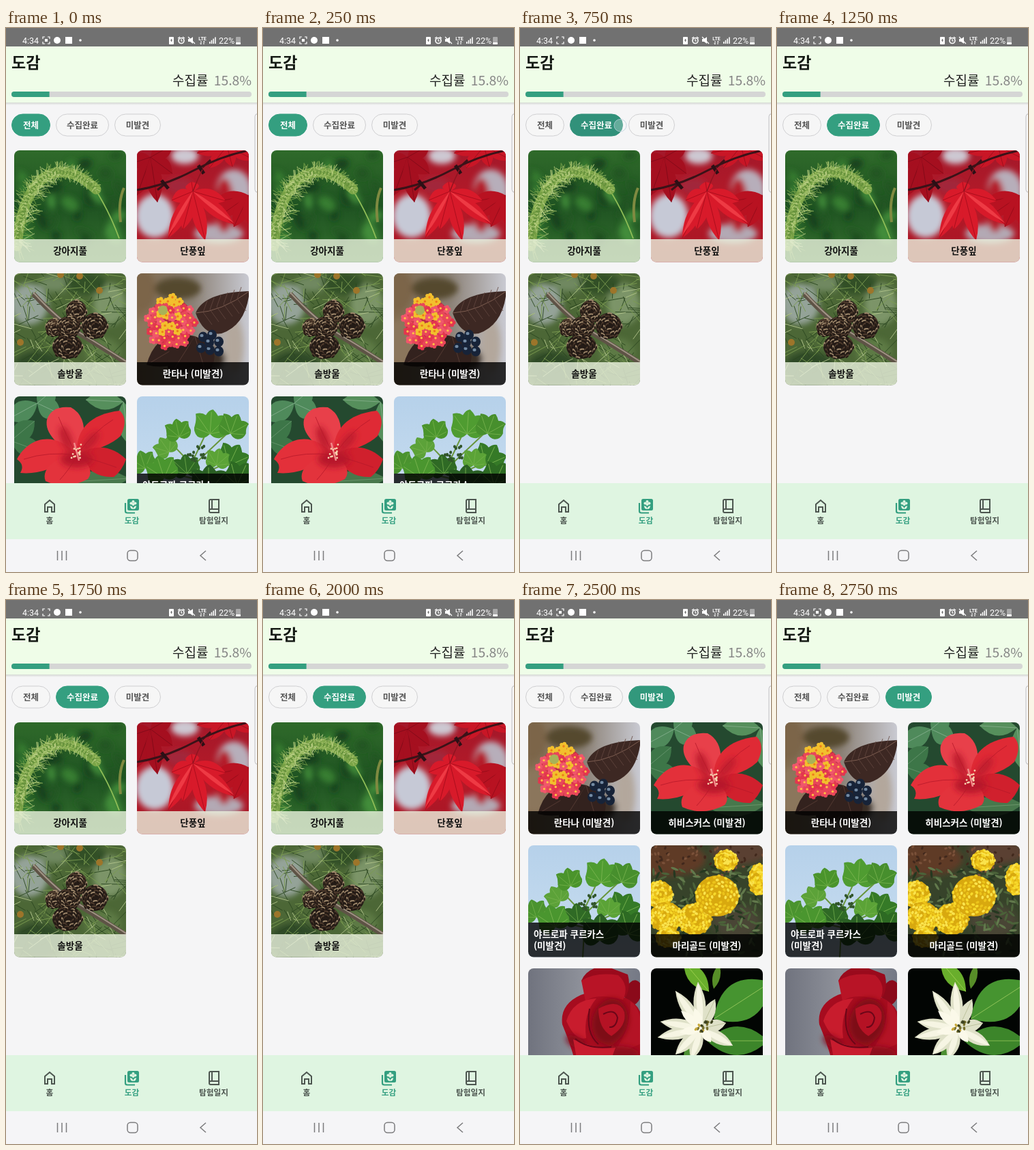
Write an HTML page that moves like this. It is 368x796 px and loops after 3 s.

```html
<!DOCTYPE html>
<html lang="ko">
<head>
<meta charset="utf-8">
<style>
html, body { margin: 0; width: 100%; height: 100%; overflow: hidden; background: #f5f5f6; }
svg { display: block; width: 100%; height: 100%; }
text { font-family: "Noto Sans CJK KR", "Noto Sans CJK", "Noto Sans", sans-serif; }
.status text { font-family: Roboto, sans-serif; fill: #fff; }
</style>
</head>
<body>
<svg id="stage" viewBox="0 0 368 796"></svg>
<script>
const GREEN = '#349f80';

// Shape helpers
let seed = 7;
const rnd = (a, b) => {
  seed = (seed * 16807) % 2147483647;
  return a + (b - a) * seed / 2147483647;
};
const pick = list => list[rnd(0, list.length) | 0];
const repeat = (n, fn) => Array.from({ length: n }, (_, i) => fn(i)).join('');
const rect = (x, y, w, h, fill, r = 0, extra = '') =>
  `<rect x="${x}" y="${y}" width="${w}" height="${h}" rx="${r}" fill="${fill}" ${extra}/>`;
const oval = (x, y, rx, ry, fill, turn = 0) =>
  `<ellipse cx="${x}" cy="${y}" rx="${rx}" ry="${ry}" fill="${fill}" transform="rotate(${turn} ${x} ${y})"/>`;
const shape = (d, fill) => `<path d="${d}" fill="${fill}"/>`;
const line = (d, color, width = 1, extra = '') =>
  `<path d="${d}" fill="none" stroke="${color}" stroke-width="${width}" ${extra}/>`;
const soft = body => `<g filter="url(#soft)">${body}</g>`;
const label = (x, y, size, fill, str, weight = 700, anchor = 'middle') =>
  `<text x="${x}" y="${y}" font-size="${size}" fill="${fill}" font-weight="${weight}" text-anchor="${anchor}">${str}</text>`;
const gradient = (id, stops, x2 = 0, y2 = 1) =>
  `<linearGradient id="${id}" x2="${x2}" y2="${y2}">${stops.map((c, i) =>
    `<stop offset="${i / (stops.length - 1)}" stop-color="${c}"/>`).join('')}</linearGradient>`;

// Fills an ellipse from its rim to its centre with evenly spread parts
const spiral = (n, x, y, rx, ry, part) => repeat(n, i => {
  const angle = i * 2.4, r = Math.sqrt(1 - i / n);
  return part(x + rx * r * Math.cos(angle), y + ry * r * Math.sin(angle), r, angle * 57.3, i);
});

// A pointed leaf or petal from one point to another, with a midrib
function leaf(x1, y1, x2, y2, width, fill, rib) {
  const len = Math.hypot(x2 - x1, y2 - y1);
  const nx = (y1 - y2) / len * width, ny = (x2 - x1) / len * width;
  const mx = (x1 + x2) / 2, my = (y1 + y2) / 2;
  return shape(`M${x1} ${y1}Q${mx + nx} ${my + ny} ${x2} ${y2}Q${mx - nx} ${my - ny} ${x1} ${y1}`, fill) +
    (rib ? line(`M${x1} ${y1}L${x2} ${y2}`, rib, .8) : '');
}
const fan = (x, y, tips, width, fill, rib) =>
  tips.map(([a, b]) => leaf(x, y, a, b, width, fill, rib)).join('');

// Pictures, each on a 164 x 164 square
function foxtail() {
  const bristle = i => {
    const t = i / 420, u = 1 - t;
    const at = (a, b, c, d) => u * u * u * a + 3 * u * u * t * b + 3 * u * t * t * c + t * t * t * d;
    const x = at(4, 12, 62, 120), y = at(140, 40, 2, 57);
    const angle = rnd(0, 6.28), reach = (6 + 16 * Math.sqrt(u)) * rnd(.7, 1.25);
    return line(`M${x} ${y}l${Math.cos(angle) * reach + 3} ${Math.sin(angle) * reach}`,
      pick(['#a9c66d', '#86ad50', '#c3d590', '#6b9440']), .8);
  };
  const ear = 'M4 140C12 40 62 2 120 57';
  return rect(0, 0, 164, 164, 'url(#meadow)') +
    soft(repeat(30, () => oval(rnd(0, 164), rnd(0, 140), rnd(6, 16), rnd(4, 10),
      pick(['#15401b', '#387e31', '#205524', '#438d3a']), rnd(0, 180)))) +
    line('M117 54Q140 90 154 129', '#8fbd57', 1.8) +
    line('M156 105Q152 75 161 55', '#7f8a41', 4) +
    line(ear, '#7ba548', 15, 'stroke-linecap="round"') + repeat(420, bristle) +
    line(ear, '#63903a', 5, 'stroke-dasharray="2 3"');
}

function maple() {
  return rect(0, 0, 164, 164, 'url(#crimson)') +
    soft(oval(26, 96, 28, 32, '#c6c9d6') + oval(142, 58, 26, 30, '#b7aeba') +
      oval(70, 8, 20, 12, '#cdc8d2') + oval(120, 122, 36, 14, '#b3a9b4') +
      oval(62, 52, 20, 12, '#a2283a') + oval(128, 80, 14, 40, '#b41c2b')) +
    fan(20, 10, [[-10, 20], [0, 66], [30, 76], [52, 34], [52, -8]], 24, '#a50f1f', '#7c0a17') +
    fan(132, -6, [[88, 4], [106, 26], [140, 24], [172, 14]], 18, '#c91626', '#930d1a') +
    fan(164, 66, [[112, 76], [118, 98], [142, 112], [168, 112]], 22, '#b81221', '#8e0b19') +
    line('M0 58Q40 52 82 30T164 0M40 50L30 58M96 25L108 14', '#3b1218', 3) +
    line('M36 44L46 56M90 22L98 34', '#2c1016', 5) +
    fan(82, 60, [[51, 73], [46, 128], [67, 116], [100, 132], [142, 108], [130, 74], [80, 46]], 20, '#d81a2a', '#a00b1a') +
    fan(82, 60, [[46, 124], [142, 106]], 6, '#ee3a44') +
    line('M82 60Q88 44 96 28', '#8e1420', 1.5);
}

function pinecones() {
  const cone = (x, y, rx, ry) => oval(x, y, rx, ry, '#241b16') +
    spiral(34, x, y, rx, ry, (px, py, r, turn, i) =>
      oval(px, py, 3.6, 1.5, i % 2 ? '#4d3a2c' : '#9a8468', turn + 90) + oval(px, py + 1.6, 2.6, 1, '#211813', turn + 90));
  const needles = (n, color) => repeat(n, () => {
    const x = rnd(-10, 174), y = rnd(-10, 174);
    return line(`M${x} ${y}l${rnd(-36, 36)} ${rnd(-30, 30)}`, color, .9);
  });
  return rect(0, 0, 164, 164, '#4c6736') +
    soft(oval(22, 45, 28, 30, '#94a398') + oval(140, 45, 24, 30, '#7b9468') + oval(60, 15, 24, 12, '#6f8860') +
      oval(35, 140, 38, 26, '#2f4a28') + oval(105, 15, 30, 16, '#334f28') + oval(130, 115, 26, 20, '#5d7a45')) +
    needles(90, '#2b4720') + needles(100, '#7c9c51') + needles(35, '#b3c48c') +
    line('M28 30Q65 70 95 88T166 132', '#5e5346', 7) +
    line('M28 28Q65 68 95 86T166 130', '#a09485', 2) +
    [[96, 4], [125, 25], [9, 101], [68, 2]].map(([x, y]) => oval(x, y, 5, 5, '#9d752a')).join('') +
    cone(91, 56, 15, 17) + cone(118, 77, 19, 19) + cone(59, 79, 13, 13) +
    cone(78, 107, 22, 18) + cone(80, 78, 18, 15);
}

function lantana() {
  const blossom = (x, y, fill, eye) => repeat(5, i =>
    oval(x + 3.6 * Math.cos(i * 1.257), y + 3.6 * Math.sin(i * 1.257), 2.9, 2.9, fill)) +
    oval(x, y, 1.7, 1.7, eye);
  const berries = [[97, 93], [110, 90], [120, 100], [94, 109], [107, 112], [120, 114], [106, 101]];
  return rect(0, 0, 164, 164, 'url(#dusk)') +
    soft(oval(5, 25, 22, 30, '#7c6548') + oval(60, 22, 34, 16, '#55492f') + oval(10, 100, 26, 34, '#8b765b') +
      oval(142, 105, 14, 40, '#b3a79c') + oval(90, 125, 40, 20, '#3b2d25')) +
    fan(85, 92, [[14, 134], [48, 150], [102, 150]], 40, '#33221e', '#5c4038') +
    shape('M86 58Q98 28 165 26Q160 76 124 88Q98 92 86 58Z', '#3d2823') +
    line('M86 58Q124 56 165 26', '#7d5d50', 1) +
    repeat(6, i => line(`M${97 + i * 10} ${57 - i * 4}l6 -17M${97 + i * 10} ${57 - i * 4}l13 18`, '#644840', .8)) +
    oval(50, 72, 33, 36, '#b92f43') +
    spiral(46, 49, 72, 35, 38, (x, y, r, turn, i) => {
      const warm = y < 48 || r < .55 && i % 2;
      return blossom(x, y, warm ? '#f2c02d' : pick(['#e3364e', '#f0566b', '#e8475a']), warm ? '#ee7d1b' : '#ffc045');
    }) +
    oval(38, 54, 7, 7, '#a8b258') +
    berries.map(([x, y]) => oval(x, y, 7, 7.5, '#172338') + oval(x - 2, y - 2, 2.6, 2.2, '#7289a2')).join('');
}

function hibiscus() {
  const red = '#df2a35', dark = '#b5182a';
  return rect(0, 0, 164, 164, '#24492f') +
    fan(34, 10, [[-10, 34], [68, 26], [60, -12]], 30, '#4f8a5b', '#8bb394') +
    fan(-5, 65, [[30, 36], [42, 82]], 28, '#3d7648', '#6b9972') +
    fan(160, 8, [[105, 5], [168, 70]], 26, '#568f5c', '#8ab18e') +
    leaf(85, 125, 168, 120, 30, '#48784c', '#739b72') +
    shape('M92 86C65 74 44 54 48 34Q55 13 83 16Q106 28 102 64Z', '#e8404a') +
    shape('M92 84C90 52 108 26 155 21Q168 34 156 58Q137 76 92 84Z', red) +
    shape('M92 86C62 50 22 58 4 92Q16 100 9 112Q44 116 92 86Z', '#e3303a') +
    shape('M93 86C122 66 148 76 164 92Q158 109 146 118Q113 120 93 86Z', '#d0202d') +
    shape('M93 85C65 86 38 105 46 124Q76 138 108 121Q120 106 93 85Z', '#e3333c') +
    soft(oval(76, 62, 8, 20, '#c01d2e', -20) + oval(112, 66, 7, 18, '#c01d2e', 40) + oval(92, 92, 24, 12, '#b81829')) +
    line('M92 86Q75 55 65 30M92 86Q118 50 145 34M92 86Q50 80 14 92M93 86Q128 96 150 104M93 86Q80 108 67 122', dark, .8) +
    line('M95 94L88 68', '#f28a8a', 2.5) +
    repeat(16, () => oval(rnd(84, 98), rnd(68, 92), 1.4, 1.4, '#f7d3ae'));
}

function jatropha() {
  const lobed = (x, y, s, turn, fill) =>
    `<g transform="translate(${x} ${y}) rotate(${turn}) scale(${s})">` +
    shape('M0 13Q-9 23 -18 18Q-26 10 -23 2Q-21 -6 -23 -15Q-14 -18 -8 -14Q-4 -22 2 -23Q7 -19 10 -14Q18 -17 24 -13Q21 -5 25 4Q24 15 15 18Q7 20 0 13Z', fill) +
    line('M0 13L0 -19M0 13L-20 -12M0 13L21 -11M0 13L-21 6M0 13L22 7', '#7fb853', .8) + '</g>';
  return rect(0, 0, 164, 164, 'url(#sky)') +
    line('M80 164L84 90L106 44M85 105L48 66M88 96L139 48M82 120L15 105M85 118L145 92', '#69963e', 2) +
    lobed(9, 96, .75, -18, '#4a932f') + lobed(42, 74, .7, -35, '#5ca239') + lobed(60, 50, .75, -12, '#4a942c') +
    lobed(108, 42, 1, 4, '#4f9c31') + lobed(141, 44, .85, 20, '#478f2d') +
    lobed(140, 90, .95, 25, '#357a27') + lobed(118, 92, .7, 8, '#5ba337') + lobed(72, 103, .8, -8, '#2f6a25') +
    lobed(36, 108, .95, -18, '#4a962f') + lobed(152, 118, 1, 24, '#2d6a23') + lobed(105, 125, 1.1, 0, '#2a5f24') +
    repeat(18, () => oval(rnd(74, 100), rnd(73, 95), 2, 2.4, '#31552a'));
}

function marigold() {
  const flower = (x, y, rx, ry) => oval(x, y, rx, ry, '#d9a90f') +
    spiral(90, x, y, rx, ry, (px, py, r, turn) =>
      oval(px, py, 2.6, 1.9, pick(['#f7d92a', '#ecc31a', '#fae34c', '#d8a90f']), turn + 90));
  return rect(0, 0, 164, 164, '#37432a') +
    soft(oval(25, 20, 55, 25, '#5f3a27') + oval(130, 10, 42, 18, '#5a4130') + oval(125, 112, 35, 25, '#4a4434')) +
    repeat(60, () => oval(rnd(0, 164), rnd(0, 45), 2.5, 1.6, pick(['#7a5139', '#41281c']), rnd(0, 180))) +
    repeat(170, () => oval(rnd(0, 164), rnd(32, 160), 6, 1.7, pick(['#62794c', '#253820', '#4b6239']), rnd(0, 180))) +
    flower(110, 22, 17, 15) + flower(12, 72, 20, 20) + flower(158, 50, 15, 23) +
    flower(22, 105, 24, 22) + flower(64, 108, 25, 23) + flower(97, 74, 32, 30) + flower(25, 135, 18, 14);
}

function rose() {
  return rect(0, 0, 164, 164, 'url(#mist)') +
    oval(154, 36, 12, 19, '#8b0a1a', 15) +
    shape('M78 18Q85 0 112 -4L146 9Q151 27 143 42L94 48Z', '#9a0a1c') +
    shape('M50 82Q46 53 77 39Q103 28 140 42Q171 55 166 85L164 164H76Q65 117 50 82Z', '#a60c1f') +
    shape('M78 18Q99 5 132 10Q149 25 139 46Q100 35 84 48Z', '#b81426') +
    shape('M56 77Q65 46 100 44Q80 67 85 102Q69 107 56 77Z', '#c81c2d') +
    shape('M150 48Q169 60 166 110L120 130Q151 93 150 48Z', '#b41325') +
    soft(oval(120, 78, 26, 34, '#7d0716', 15) + oval(70, 108, 16, 8, '#84081a', 30) + oval(135, 126, 28, 12, '#8d0a1c')) +
    shape('M103 59Q133 43 141 64Q145 84 122 99Q103 88 103 59Z', '#b51224') +
    shape('M66 104Q101 119 128 116L110 164H77Z', '#c81c2e') +
    line('M110 67Q127 58 131 72Q129 87 119 86M90 59Q84 95 103 111M69 103Q88 119 122 115', '#6b0618', 2);
}

function champaca() {
  const tips = [[36, 33], [69, 20], [14, 78], [10, 101], [36, 126], [59, 133], [120, 113], [94, 45], [110, 80]];
  return rect(0, 0, 164, 164, '#020503') +
    leaf(48, -10, 85, 34, 24, '#69ae2c', '#a8d755') + leaf(100, -6, 92, 30, 11, '#578e28') +
    leaf(92, 74, 176, 20, 56, '#469430', '#a2cf63') + leaf(82, 106, 172, 106, 42, '#3c852a', '#98c75b') +
    leaf(75, 90, 48, 136, 18, '#4c8f32') +
    fan(74, 88, tips, 18, '#dfe1c8', '#b4ba92') + fan(74, 88, tips.slice(0, 7), 9, '#f6f5e3') +
    fan(74, 88, [[44, 62], [42, 94], [64, 58], [88, 108]], 12, '#fbf9e9') +
    repeat(14, () => oval(rnd(66, 90), rnd(78, 93), 2.8, 1.8, pick(['#c8a93c', '#77702d', '#3f4420']), rnd(0, 180)));
}

// Cards
const plants = {
  foxtail: ['강아지풀'], maple: ['단풍잎'], pinecones: ['솔방울'],
  lantana: ['란타나 (미발견)'], hibiscus: ['히비스커스 (미발견)'],
  jatropha: ['야트로파 쿠르카스', '(미발견)'], marigold: ['마리골드 (미발견)'],
  rose: ['장미 (미발견)'], champaca: ['참파카 (미발견)']
};
const pictures = { foxtail, maple, pinecones, lantana, hibiscus, jatropha, marigold, rose, champaca };
const names = Object.keys(plants);
const views = [names.slice(0, 6), names.slice(0, 3), names.slice(3)];

function card(name) {
  const [first, second] = plants[name];
  const found = names.indexOf(name) < 3;
  const top = second ? 113 : 130;
  const ink = found ? '#111' : '#fff';
  return `<g id="${name}" clip-path="url(#card)">` + pictures[name]() +
    rect(0, top, 164, 164 - top, found ? '#ebf3df' : '#000', 0, 'opacity=".8"') +
    (second
      ? label(8, 134.5, 13.5, ink, first, 700, 'start') + label(8, 151.5, 13.5, ink, second, 700, 'start')
      : label(82, 152, 13.5, ink, first)) + '</g>';
}
const grid = list => list.map((name, i) =>
  `<use href="#${name}" x="${i % 2 ? 192 : 12}" y="${179 + (i >> 1) * 180}"/>`).join('');

// Fixed interface
const tabs = [[8, 57, '전체'], [73, 78, '수집완료'], [159, 68, '미발견']];

const statusBar = `<g class="status">` + rect(0, 0, 368, 27, '#717171') +
  label(24, 22.5, 12.5, '#fff', '4:34', 400, 'start') +
  line('M54 16V13H57M61 13H64V16M64 20V23H61M57 23H54V20', '#fff', 1.2) +
  `<g id="scanDot">${rect(57, 16, 4, 4, '#fff')}</g>` +
  oval(75, 18, 5, 5, '#fff') + rect(87, 13, 10, 10, '#fff') + oval(109, 18, 1.8, 1.8, '#fff') +
  rect(239, 13, 7, 11, '#fff', 1) + line('M241 18H244M242.5 16V20', '#717171', 1) +
  `<circle cx="257" cy="18.5" r="4" fill="none" stroke="#fff" stroke-width="1.6"/>` +
  line('M257 16V19H259M252 15L255 13M262 15L259 13', '#fff', 1.2) +
  shape('M267 16H270L274 13V23L270 20H267Z', '#fff') + line('M267 13L277 23', '#fff', 1.3) +
  label(288, 17.5, 7, '#fff', 'LTE') + line('M286 19V24M284.5 22.5L286 24M290 24V19M291.5 20.5L290 19', '#fff', 1) +
  repeat(4, i => rect(298 + i * 2.7, 20 - i * 2.2, 1.6, 3 + i * 2.2, '#fff')) +
  label(312, 22.5, 12.5, '#fff', '22%', 400, 'start') +
  rect(337, 13, 7, 11, '#aaa', 1) + rect(337, 21, 7, 3, '#fff', 1) + '</g>';

const header = rect(0, 109, 368, 4, 'url(#shade)') + rect(0, 27, 368, 82, '#effde8') +
  label(8, 58.5, 23, '#151a15', '도감', 700, 'start') +
  label(296.5, 84, 19, '#222', '수집률', 400, 'end') + label(360, 84, 19.3, '#858585', '15.8%', 400, 'end') +
  rect(8, 93, 352, 8, '#d5d6d5', 4) + shape('M12 93H63.6V101H12A4 4 0 0 1 12 93', GREEN);

const navigation = rect(0, 666, 368, 82, '#dff5e1') +
  line('M57 708V697L64 691L71 697V708H67V701H61V708Z', '#4d5650', 2) +
  label(64, 724.5, 11.7, '#4d5650', '홈') +
  line('M175 695V707Q175 709.5 178 709.5H189', GREEN, 2.2) + rect(178, 689, 17, 17, GREEN, 2.5) +
  [[186.5, 693], [183.5, 695.5], [189.5, 695.5], [186.5, 697]].map(([x, y]) => oval(x, y, 2, 2, '#dff5e1')).join('') +
  shape('M182 699Q186.5 700 186.5 704Q186.5 700 191 699Q191 704 186.5 704Q182 704 182 699', '#dff5e1') +
  label(184.5, 724.5, 11.7, GREEN, '도감') +
  line('M312 690H300Q298 690 298 692V707Q298 709 300 709H312ZM302 690V704M298 706Q298 704 300 704H312', '#4d5650', 2) +
  label(304.5, 724.5, 11.7, '#4d5650', '탐험일지') +
  rect(0, 748, 368, 48, '#f5f5f7') +
  line('M75.5 765V779M82 765V779M88.5 765V779', '#7b7b7d', 1.5) +
  rect(178, 764.5, 15, 15, 'none', 4.5, 'stroke="#7b7b7d" stroke-width="1.5"') +
  line('M293 765L285 772L293 779', '#7b7b7d', 1.5);

const stage = document.getElementById('stage');
stage.innerHTML = '<defs>' +
  '<clipPath id="card"><rect width="164" height="163.5" rx="8"/></clipPath>' +
  '<filter id="soft" x="-20%" y="-20%" width="140%" height="140%"><feGaussianBlur stdDeviation="4"/></filter>' +
  gradient('meadow', ['#2f6a2a', '#1f5322', '#34702e']) +
  gradient('crimson', ['#a3182a', '#b61a28', '#a51424']) +
  gradient('dusk', ['#7f694c', '#8b8176', '#c9cad2'], 1, 0) +
  gradient('sky', ['#b6d1ea', '#c9def0']) +
  gradient('mist', ['#70737e', '#8f929b', '#757985'], 1, 0) +
  gradient('shade', ['#d5d8d4', '#f5f5f6']) +
  names.map(card).join('') + '</defs>' +
  rect(0, 0, 368, 796, '#f5f5f6') +
  views.map(list => `<g class="view">${grid(list)}</g>`).join('') +
  tabs.map(([x, w, name]) => `<g class="tab">` +
    rect(x + .5, 126, w - 1, 32, 'none', 16) +
    label(x + w / 2, 147, 12.5, '#555', name) + '</g>').join('') +
  '<circle id="touch" cy="142.5" r="9" fill="#fff" fill-opacity=".25" stroke="#b9cfda" stroke-opacity=".8"/>' +
  rect(365, 125.5, 12, 115, '#f8f8f8', 4, 'stroke="#bdbdc0"') +
  header + statusBar + navigation;

const viewNodes = stage.querySelectorAll('.view');
const tabNodes = stage.querySelectorAll('.tab');
const touch = document.getElementById('touch');
const scanDot = document.getElementById('scanDot');
const show = (node, on) => node.setAttribute('visibility', on ? 'visible' : 'hidden');
const within = (t, from, to) => t >= from && t < to;

function draw() {
  const t = performance.now() % 3000;
  const view = t < 750 ? 0 : t < 2500 ? 1 : 2;
  const tab = t < 750 ? 0 : t < 2250 ? 1 : 2;
  const pressed = within(t, 750, 1000) || within(t, 2250, 2500);
  const active = pressed ? '#31917a' : within(t, 2500, 2750) ? '#32987c' : GREEN;

  viewNodes.forEach((node, i) => show(node, i === view));
  tabNodes.forEach((node, i) => {
    const [pill, name] = node.children;
    pill.setAttribute('fill', i === tab ? active : '#f6f6f6');
    pill.setAttribute('stroke', i === tab ? active : '#cfcfd1');
    name.setAttribute('fill', i === tab ? '#fff' : '#555');
  });
  show(touch, within(t, 500, 1000) || within(t, 2250, 2500));
  touch.setAttribute('cx', t < 1500 ? 147 : 223);
  show(scanDot, !within(t, 750, 2500));
  requestAnimationFrame(draw);
}
draw();
</script>
</body>
</html>
```
